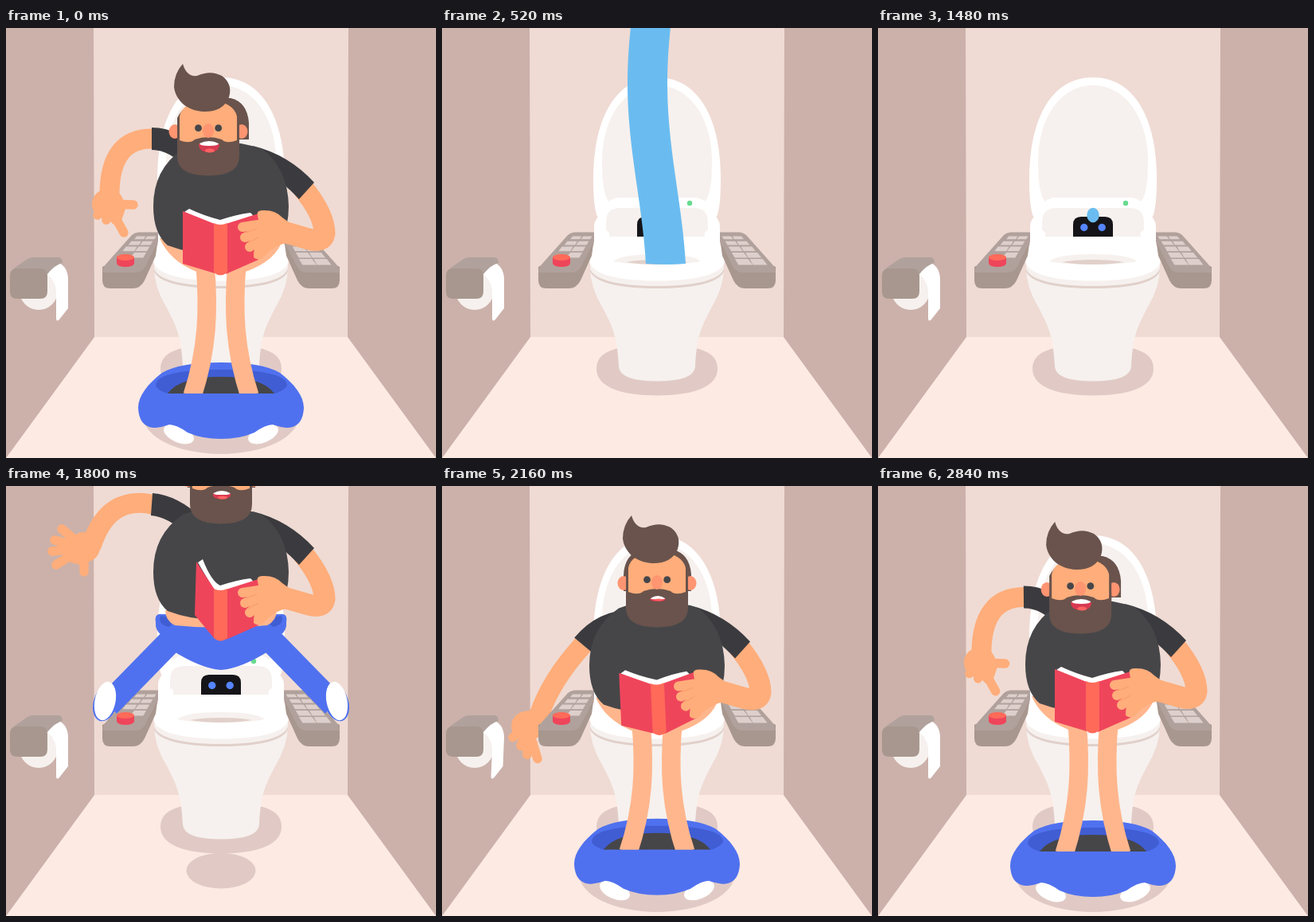
Write an HTML page with a canvas that moves like this. It is 540x540 px and loops after 2.88 s.

```html
<!DOCTYPE html>
<html lang="en">
<head>
<meta charset="utf-8">
<title>Bathroom launch</title>
<style>
html, body { margin: 0; width: 100%; height: 100%; overflow: hidden; background: #efdbd4; }
canvas { display: block; width: 540px; height: 540px; }
</style>
</head>
<body>
<canvas width="540" height="540"></canvas>
<script>
const LOOP = 2880;
const ctx = document.querySelector('canvas').getContext('2d');
const C = {
  wall: '#efdbd4', side: '#cbb1aa', floor: '#fdeae3', shade: '#e1cac5', pale: '#f6f1ee', white: '#ffffff',
  rim: '#e1d0ca', panel: '#b1a19c', panelDark: '#a8978e', key: '#ddcfcb', red: '#ef455b', coral: '#ff6a59',
  black: '#151519', eye: '#5585ff', green: '#67da8e', water: '#6abcf0',
  skin: '#ffad7a', leg: '#ffb68d', ear: '#ff9571', hair: '#69534c', shirt: '#464649', sleeve: '#3b3b3f',
  jeans: '#5071ef', jeansDark: '#405dd3'
};

// Timing helpers
const clamp = v => Math.max(0, Math.min(1, v));
const part = (t, a, b) => clamp((t - a) / (b - a));
const smooth = u => (1 - Math.cos(Math.PI * u)) / 2;
const mix = (a, b, u) => a + (b - a) * u;
const mixPoint = (p, q, u) => [mix(p[0], q[0], u), mix(p[1], q[1], u)];
const mixPoints = (a, b, u) => a.map((p, i) => mixPoint(p, b[i], u));

// Drawing helpers
function fill(color, d) {
  ctx.fillStyle = color;
  ctx.fill(new Path2D(d));
}
function line(color, width, d, cap = 'butt') {
  ctx.strokeStyle = color;
  ctx.lineWidth = width;
  ctx.lineCap = cap;
  ctx.lineJoin = 'round';
  ctx.stroke(new Path2D(d));
}
function oval(color, x, y, rx, ry = rx, turn = 0) {
  ctx.fillStyle = color;
  ctx.beginPath();
  ctx.ellipse(x, y, rx, ry, turn, 0, 7);
  ctx.fill();
}
function group(draw, x = 0, y = 0, sx = 1, sy = 1, ox = 0, oy = 0, turn = 0) {
  ctx.save();
  ctx.translate(x + ox, y + oy);
  ctx.rotate(turn);
  ctx.scale(sx, sy);
  ctx.translate(-ox, -oy);
  draw();
  ctx.restore();
}
const mirror = draw => group(draw, 0, 0, -1, 1, 270, 0);
const both = draw => { draw(); mirror(draw); };

function room(t) {
  fill(C.wall, 'M0 0H540V540H0Z');
  fill(C.floor, 'M111 388H429L540 540H0Z');
  fill(C.side, 'M0 0H110L111 388L0 540Z');
  fill(C.side, 'M540 0H430L429 388L540 540Z');
  // Paper holder
  const sway = t > 1960 && t < 2440 ? -1.5 * Math.sin(Math.PI * part(t, 1960, 2440)) : 0;
  oval(C.pale, 41, 330, 24);
  fill(C.white, `M49 307Q58 298 65 294Q78 300 78 316L${78 + sway} 352L${67 + sway} 366Q${63 + sway} 370 ${63 + sway} 364L63 331Q63 317 49 307Z`);
  fill(C.panel, 'M6 310Q7 303 14 299L27 290Q30 288 35 288H66Q71 289 71 295Q62 297 52 309Z');
  fill(C.panelDark, 'M14 302H43Q52 302 52 311V331Q52 340 43 340H14Q5 340 5 331V311Q5 302 14 302Z');
}

function toilet(lift) {
  fill(C.white, 'M197 240Q190 232 190 190C190 110 220 62 270 62C320 62 350 110 350 190Q350 232 343 240Z');
  fill(C.pale, 'M214 220Q201 218 201 168C201 112 230 72 270 72C310 72 339 112 339 168Q339 218 326 220Z');
  fill(C.white, 'M191 300V250Q191 238 202 234Q206 213 224 213H316Q334 213 338 234Q349 238 349 250V300Z');
  fill(C.pale, 'M206 254V244Q206 226 224 226H316Q334 226 334 244V254Q328 256 330 262H210Q212 256 206 254Z');
  oval(C.green, 311, 220, 3.2);
  fill(C.black, 'M245 262V247Q245 237 255 237H285Q295 237 295 247V262Z');
  both(() => oval(C.eye, 258.8, 250.5, 4.7));
  // Bowl
  fill(C.pale, 'M186 300Q186 325 201 350C215 376 220 388 222 425Q223 443.500 270 443.500Q317 443.500 318 425C320 388 325 376 339 350Q354 325 354 300Z');
  fill(C.rim, 'M186 298V305C190 320 225 327 270 327C315 327 350 320 354 305V298Z');
  fill(C.pale, `M186 294V${302 - lift}C190 ${317 - lift} 225 ${324 - lift} 270 ${324 - lift}C315 ${324 - lift} 350 ${317 - lift} 354 ${302 - lift}V294Z`);
  group(() => {
    fill(C.white, 'M185 292Q186 276 194 268L205 262H335L346 268Q354 276 355 292C353 309 320 317.500 270 317.500C220 317.500 187 309 185 292Z');
    fill(C.pale, 'M215 293Q226 284 270 284Q314 284 325 293Q306 297 270 297Q234 297 215 293Z');
    fill(C.rim, 'M231 294Q246 291 270 291Q294 291 309 294Q292 297 270 297Q248 297 231 294Z');
  }, 0, -lift / 2);
}

function controls(hasButton) {
  fill(C.panelDark, 'M121 300V317Q121 327 131 327H159Q169 327 174 317L188 286L191 264Z');
  fill(C.panel, 'M121 307Q121 302 125 297L158 260Q161 257 166 256.500H191V268L175 299Q171 307 163 307Z');
  // Keys grow towards the viewer
  for (let row = 0; row < (hasButton ? 4 : 5); row++) {
    const y = 261.5 + row * 6 + row * row * 0.28;
    const h = 3.8 + row * 0.9, w = 11.2 + row * 1.3;
    for (let col = 0; col < 2; col++) {
      if (hasButton && row === 3 && col) continue;
      const x = 188.5 - row * 4.1 - col * (w + 2);
      fill(C.key, `M${x} ${y}H${x - w}L${x - w - h * 0.8} ${y + h}H${x - h * 0.6}Z`);
    }
  }
  if (hasButton) {
    fill(C.red, 'M139 288V296Q141 300 150 300Q159 300 161 296V288Z');
    oval(C.coral, 150, 288, 11, 4);
  }
}

function water(t) {
  if (t < 130 || t > 1690) return;
  const calm = smooth(part(t, 1080, 1160));
  const drain = part(t, 1160, 1400);
  const width = t < 1160 ? mix(50, 38, calm) : mix(38, 8, drain);
  const top = t < 1160 ? mix(290, -10, part(t, 130, 200)) : mix(-10, 298, drain * drain);
  const swing = 12 * part(t, 130, 220) * (1 - calm);
  const center = y => 270 - swing * Math.cos(0.012 * (y - 175) + 2 * Math.PI * (t - 840) / 400);
  if (drain < 1) {
    let left = '', right = '';
    for (let y = top; y < 296; y += 6) {
      left += `L${center(y) - width / 2} ${y}`;
      right = `L${center(y) + width / 2} ${y}` + right;
    }
    const x = center(296);
    if (left) fill(C.water, `M${left.slice(1)}L${x - width / 2} 296Q${x} 298 ${x + width / 2} 296${right}Z`);
  }
  if (t >= 1360) {
    const u = part(t, 1360, 1680);
    ctx.save();
    ctx.beginPath();
    ctx.rect(0, 0, 540, 297);
    ctx.clip();
    oval(C.water, 270, 306 - 4 * u * (1 - u) * 75.5, 7.7, 9.2);
    ctx.restore();
  }
}

// Arm points: cuff, elbow, wrist, palm, sleeve bend, then five finger tips
const PRESS = [[183, 139], [131, 139], [130, 207], [128, 221], [212, 139],
  [160, 222], [148, 257], [137, 241], [126, 241], [115, 235]];
const HANG = [[177, 198], [137, 242], [122, 286], [107, 300], [202, 168],
  [120, 341], [107, 336], [99, 325], [89, 314], [97, 295]];
const WAVE = [[183, 139], [128, 128], [108, 189], [98, 193], [210, 141],
  [98, 224], [63, 215], [58, 198], [61, 184], [70, 170]];

function armPose(t) {
  if (t < 400) {
    const dip = 27 * smooth(part(t, 20, 100));
    const down = PRESS.map(([x, y], i) => [x, y + (i && i !== 4 ? dip : 0)]);
    return mixPoints(down, WAVE, smooth(part(t, 110, 220)));
  }
  if (t < 2240) return mixPoints(WAVE, HANG, smooth(part(t, 1840, 2130)));
  return mixPoints(HANG, PRESS, smooth(part(t, 2240, 2880)));
}

function reachingArm(pose) {
  const [cuff, elbow, wrist, palm, bend, ...tips] = pose;
  line(C.skin, 25, `M${cuff}Q${elbow} ${wrist}L${palm}`, 'round');
  line(C.sleeve, 28, `M238 168Q${bend} ${cuff}`);
  oval(C.skin, palm[0], palm[1], 20, 19);
  tips.forEach(tip => line(C.skin, 11.5, `M${palm}L${tip}`, 'round'));
  // Fill the hand between the knuckles
  const knuckles = `M${tips.map(tip => mixPoint(palm, tip, 0.55)).join('L')}Z`;
  fill(C.skin, knuckles);
  line(C.skin, 12, knuckles);
}

function readingArm() {
  line(C.skin, 27, 'M372 200Q400 234 400 258Q398 270 380 265L335 252');
  fill(C.sleeve, 'M310 148Q355 159 387 194L368 215Q345 190 325 182Z');
}

function readingHand() {
  fill(C.skin, 'M316 236Q314 229 322 229Q338 228 347 238L358 246L352 270Q336 273 323 288Q317 293 311 288L312 270L318 246Z');
  ['L297 250', 'L300 263', 'L306 275', 'L317 284'].forEach((end, i) =>
    line(C.skin, 12, `M${330 - i} ${245 + i * 5}${end}`, 'round'));
  line('#f59d6b', 1, 'M301 257L315 252M304 270L317 263');
}

function book(fold) {
  const x = 222 + 17 * fold, y = 230 - 19 * fold;
  fill(C.white, `M${x + 2} ${y + 1}L${x + 8} ${y - 3}Q${x + 27 - 8 * fold} 236 269 241Q290 234 307 232L312 237L270 250L262 248Z`);
  fill(C.red, `M${x} ${y}L262 246V308L${x - 2 * fold} ${296 - 18 * fold}Z`);
  fill(C.red, 'M276 246L317 233V291L276 309Z');
  fill(C.coral, 'M261 245Q269 249 278 245V307Q269 314 261 307Z');
}

function head(turn, open, lift) {
  const x = -16 * turn, y = 8 * turn - lift;
  group(() => fill(C.hair, 'M228 120V112Q229 86 250 80H290Q311 85 313 111V132H228Z'), x / 2, y);
  group(() => {
    oval(C.ear, 228, 122, 7.5, 9);
    oval(C.ear, 312, 122, 7.5, 9);
    fill(C.hair, 'M231 140V105Q240 85 270 82Q300 85 309 105V140Z');
    fill(C.skin, 'M234 140V103Q237 85 270 82Q302 85 306 103V140Z');
    fill(C.hair, 'M231 125L234 133Q247 138 253 132Q270 126 287 132Q293 138 306 133L309 125V153Q309 177.500 270 177.500Q231 177.500 231 153Z');
    oval(C.ear, 270, 121, 7, 9);
    oval(C.shirt, 257.5, 117.7, 4.4);
    oval(C.shirt, 282.7, 117.7, 4.4);
    const w = 10 + 3 * open, top = 139 - 4 * open, bottom = 145 + 3 * open;
    fill('#d73a51', `M${271 - w} ${top + 3}Q271 ${top - 4} ${271 + w} ${top + 3}Q${271 + w} ${bottom} 271 ${bottom}Q${271 - w} ${bottom} ${271 - w} ${top + 3}Z`);
    fill(C.white, `M${272 - w} ${top + 2}Q271 ${top - 4} ${270 + w} ${top + 2}Q${270 + w} ${top + 4 + open} 271 ${top + 3 + open * 2}Q${272 - w} ${top + 4 + open} ${272 - w} ${top + 2}Z`);
    oval('#ff6262', 272, bottom - 2, 6, 1.5 + open);
    fill(C.hair, 'M238 37Q243 54 256 52C270 46 278 48 287 52Q301 62 296 79Q289 97 265 97C242 96 229 82 227 66Q227 49 238 37Z');
  }, x, y);
}

// Jeans around the ankles; stretch pulls them tall and narrow
function droppedJeans(y, stretch, bodyY) {
  const sx = 1 - 0.19 * stretch;
  if (stretch < 0.5) both(() => oval(C.white, 217, 510 + y, 20, 10.5, 0.4));
  group(() => fill(C.jeans, 'M270 420Q218 420 196 433C178 447 166 462 166 477C167 497 177 502 188 502Q197 501 205 498Q214 498 228 508Q246 516 270 516Q294 516 312 508Q326 498 335 498Q343 501 352 502C363 502 373 497 374 477C374 462 362 447 344 433Q322 420 270 420Z'),
    0, y, sx, 1 + 0.385 * stretch, 270, 420);
  group(() => {
    fill(C.jeansDark, 'M188 449C188 434 225 429 270 429C315 429 353 434 353 449Q350 455 338 459H203Q190 455 188 449Z');
    group(() => fill(C.shirt, 'M203 459Q218 438 270 438Q322 438 337 459Z'), 0, 0, 1, 1 - 0.75 * stretch, 270, 459);
  }, 0, y, sx * 0.95 + 0.05, 1, 270, 420);
  const top = 296 + bodyY, foot = 462 + y;
  both(() => line(C.leg, 23.5,
    `M${250 - 22 * stretch} ${top}C${255 - 18 * stretch} ${mix(top, foot, 0.35)} ${253 - 14 * stretch} ${mix(top, foot, 0.65)} ${234 + 9 * stretch} ${foot}`));
  group(() => fill(C.jeans, 'M205 459H335V472H205Z'), 0, y, sx, 1, 270, 420);
}

function wornJeans() {
  both(() => {
    line(C.jeans, 31, 'M212 305L128 391');
    oval(C.jeans, 125, 388, 15, 24, 0.3);
    oval(C.white, 124.5, 386, 13, 24.5, 0.2);
  });
  fill(C.jeans, 'M188 287Q186 275 196 277H344Q354 275 352 287Q353 297 345 303L332 322Q296 345 270 347Q244 345 208 322L195 303Q187 297 188 287Z');
  both(() => fill(C.jeansDark, 'M194 279Q190 290 205 293L215 282Z'));
  fill(C.leg, 'M200 272Q200 285 212 291Q270 297 328 291Q340 285 340 272Z');
}

function manState(t) {
  if (t >= 340 && t < 1690) return null;
  const state = { bodyY: 0, jeansY: 0, stretch: 0, turn: 0, open: 0, lift: 0, fold: 0, tilt: 0, falling: false };
  if (t < 340) {
    const u = Math.max(0, (t - 110) / 130);
    state.jeansY = -378 * u ** 1.5;
    state.bodyY = state.jeansY * 1.6;
    state.stretch = clamp(u);
    state.turn = 1 - clamp(u);
    state.open = 1;
  } else if (t < 1840) {
    Object.assign(state, { bodyY: (t - 1840) * 2.975, falling: true, open: 0.5, lift: 14, fold: 1 });
  } else {
    const land = part(t, 1840, 1960), settle = part(t, 1960, 2240);
    const wobble = Math.sin(settle * Math.PI * 3) * (1 - settle);
    state.stretch = 1 - smooth(land);
    state.fold = 1 - smooth(part(t, 1840, 2080));
    state.turn = smooth(part(t, 2240, 2880));
    state.tilt = (1 - state.turn) * (1 - state.fold);
    state.jeansY = -215 * (1 - land * land) - 5 * wobble - 1.5 * state.tilt;
    state.bodyY = 5 * Math.sin(Math.PI * land) + 1.5 * state.tilt;
    state.lift = 14 * (1 - smooth(land)) + 1.5 * state.tilt;
    state.open = Math.max(0.5 - 0.5 * part(t, 1900, 2080), state.turn);
  }
  return state;
}

function man(state, pose, armDrawn) {
  const { bodyY, jeansY, stretch, tilt, falling } = state;
  if (!falling) droppedJeans(jeansY, stretch, bodyY);
  group(() => {
    if (falling) wornJeans();
    else fill(C.leg, 'M193 264Q205 292 239 306H301Q340 292 348 264Z');
    if (!armDrawn) reachingArm(pose);
    readingArm();
    fill(C.shirt, 'M222 152Q185 177 185 224Q185 258 203 273Q235 285 270 284Q322 284 345 266Q355 250 355 224Q354 177 322 152Q270 134 222 152Z');
    group(() => book(state.fold), 2 * tilt, tilt, 1, 1, 270, 270, -0.045 * tilt);
    readingHand();
    head(state.turn, state.open, state.lift);
  }, 0, bodyY);
}

function manShadow(t) {
  let size = 0;
  if (t < 400) size = t < 240 ? mix(1, 0.44, part(t, 110, 240)) : mix(0.44, 0, part(t, 240, 340));
  else if (t > 1690) size = t < 1800 ? mix(0, 0.44, part(t, 1690, 1800)) : mix(0.44, 1, part(t, 1800, 1930));
  if (size > 0) oval(C.shade, 270, mix(480, 487, size), 98 * size, mix(0, 48, size) + 4 * size * (1 - size));
}

function draw(t) {
  const state = manState(t), pose = armPose(t);
  const armBehind = t > 1980 && t < 2480;
  room(t);
  fill(C.shade, 'M194 428C194 406 218 398 270 398C322 398 346 406 346 428C346 450 317 461.500 270 461.500C223 461.500 194 450 194 428Z');
  manShadow(t);
  toilet(t < 560 ? 7 * part(t, 130, 200) * (1 - part(t, 260, 480)) : 0);
  water(t);
  if (state && armBehind) group(() => reachingArm(pose), 0, state.bodyY);
  controls(true);
  mirror(() => controls(false));
  if (state) man(state, pose, armBehind);
}

const start = performance.now();
function tick() {
  draw((performance.now() - start) % LOOP);
  requestAnimationFrame(tick);
}
tick();
</script>
</body>
</html>
```
